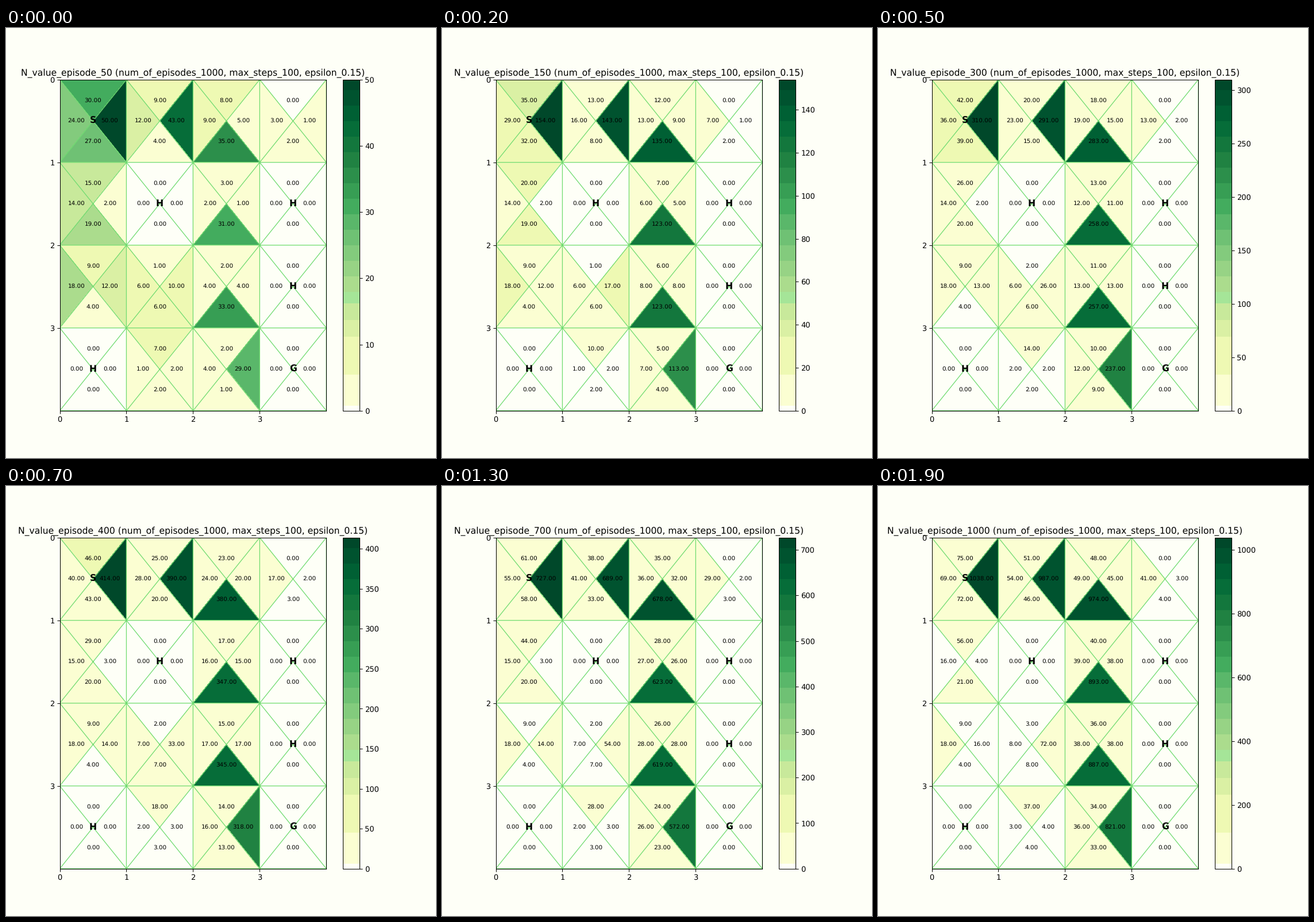
A matplotlib script that plays this animation: 748 px wide and 748 px high, repeating every 2000 ms.

```python
import matplotlib.pyplot as plt
import numpy as np
from matplotlib.animation import FuncAnimation
from matplotlib.colors import ListedColormap
from matplotlib.tri import Triangulation

PAPER = (254 / 255, 1, 247 / 255)
LINE = "#72dc72"
SIZE = 4
FRAMES = 20
EPISODES = 50  # episodes per frame

# Each side of a cell: step to the neighbour and label offset (row, column).
SIDES = {"T": (-1, 0), "L": (0, -1), "R": (0, 1), "B": (1, 0)}
OPPOSITE = {"T": "B", "L": "R", "R": "L", "B": "T"}
MARKS = {"00": "S", "11": "H", "13": "H", "23": "H", "30": "H", "33": "G"}

# The learned route, and the side cells a slip can lead to.
ROUTE = ("00", "01", "02", "12", "22", "32")
NEARBY = ("03", "10", "21", "31")

# Exits counted in the first episodes; the rest follows from the flow.
EARLY = {
    "00": dict(T=30, L=24, B=27),
    "01": dict(T=9, L=12, B=4),
    "02": dict(T=8, L=9, R=5),
    "03": dict(R=1, B=2),
    "10": dict(L=14, R=2, B=19),
    "12": dict(T=3, L=2, R=1),
    "20": dict(T=9, L=18, B=4),
    "21": dict(T=1, L=6, B=6),
    "22": dict(T=2, L=4, R=4),
    "31": dict(L=1, R=2, B=2),
    "32": dict(T=2, L=4, B=1),
}
# Remaining exit of every cell, in the order it can be worked out.
MAIN_EXITS = "L03 T10 R00 R01 B02 B12 R20 T31 R21 B22 R32".split()

cells = [f"{r}{c}" for r in range(SIZE) for c in range(SIZE)]


def slip_rate(cell):
    """Wrong turns per episode once the route is learned."""
    if cell in ROUTE:
        return 0.047 - 0.0027 * ROUTE.index(cell)
    return 0.002 if cell in NEARBY else 0


def neighbour(cell, side):
    r, c = (int(k) + d for k, d in zip(cell, SIDES[side]))
    return f"{r}{c}" if 0 <= r < SIZE and 0 <= c < SIZE else None


def visits(episode):
    n = {s + cell: 0 for cell in cells for s in SIDES}
    for cell, exits in EARLY.items():
        for side, count in exits.items():
            n[side + cell] = round(count + slip_rate(cell) * (episode - EPISODES))
    # Whoever enters a cell must leave it; bumps into the border cancel out.
    for key in MAIN_EXITS:
        cell = key[1:]
        total = episode if cell == "00" else 0
        for side in SIDES:
            other = neighbour(cell, side)
            if other:
                total += n[OPPOSITE[side] + other] - n[side + cell]
        n[key] = total
    return np.array([n[s + cell] for cell in cells for s in SIDES])


def banded_greens():
    edges = np.r_[0, 4, 28, 57, 70, 83, 92:256:12, 256]
    base = plt.get_cmap("YlGn")
    lut = np.ones((256, 4))
    for lo, hi in zip(edges, edges[1:]):
        lut[lo:hi] = base((lo + 0.45 * (hi - lo)) / 255)
    lut[:4, :3] = PAPER
    lut[83:92, :3] = np.array((165, 229, 152)) / 255
    return ListedColormap(lut)


def mesh_grid():
    w = SIZE + 1
    xs, ys = np.meshgrid(np.arange(w), np.arange(w))
    mx, my = np.meshgrid(np.arange(SIZE) + 0.5, np.arange(SIZE) + 0.5)
    tris = []
    for i, (r, c) in enumerate(np.ndindex(SIZE, SIZE)):
        a = r * w + c
        b, d, e = a + 1, a + w, a + w + 1
        m = w * w + i
        tris += [(a, b, m), (a, m, d), (b, e, m), (d, m, e)]
    return Triangulation(np.r_[xs.ravel(), mx.ravel()],
                         np.r_[ys.ravel(), my.ravel()], tris)


def put_text(cell, side, text, **style):
    dr, dc = SIDES.get(side, (0, 0))
    return ax.text(int(cell[1]) + 0.5 + dc / 4, int(cell[0]) + 0.498 + dr / 4.03,
                   text, ha="center", va="center", **style)


plt.rcParams["text.hinting"] = "none"
fig, ax = plt.subplots(figsize=(8, 8), dpi=93.5, facecolor=PAPER)
ax.set_facecolor(PAPER)

tri = mesh_grid()
first = visits(EPISODES)
mesh = ax.tripcolor(tri, facecolors=first.astype(float), cmap=banded_greens(),
                    vmin=0, vmax=first.max())
ax.triplot(tri, color=LINE, lw=1)
ax.set(xlim=(0, SIZE), ylim=(SIZE, 0), xticks=range(SIZE), yticks=range(SIZE))
fig.colorbar(mesh, ax=ax)
title = ax.set_title("")

labels = [put_text(cell, s, "", fontsize=8) for cell in cells for s in SIDES]
for cell, mark in MARKS.items():
    put_text(cell, None, mark, fontsize=12, weight="bold")


def update(i):
    episode = EPISODES * (i + 1)
    n = visits(episode)
    mesh.set_array(n.astype(float))
    mesh.set_clim(0, n.max())
    for label, value in zip(labels, n):
        label.set_text(f"{value:.2f}")
    title.set_text(f"N_value_episode_{episode} "
                   "(num_of_episodes_1000, max_steps_100, epsilon_0.15)")
    return []


anim = FuncAnimation(fig, update, frames=FRAMES, interval=100,
                     init_func=lambda: update(0), repeat=True, repeat_delay=0)
plt.show()
```
